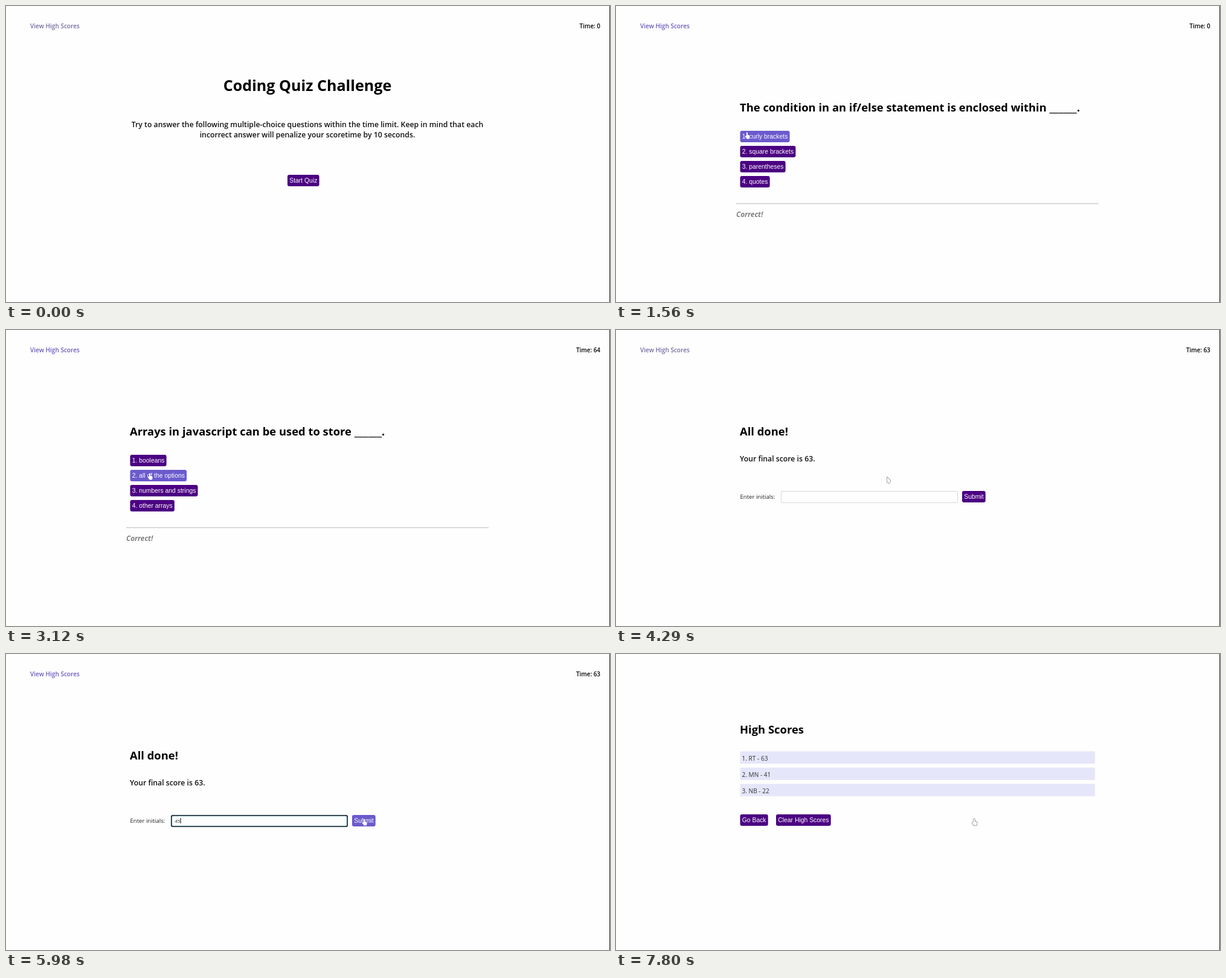
Write an HTML page with a canvas that moves like this. It is 1000x491 px and loops after 8000 ms.

```html
<!DOCTYPE html>
<html lang="en">
<head>
<meta charset="utf-8">
<title>Coding Quiz Challenge</title>
<style>
html, body { margin: 0; width: 100%; height: 100%; overflow: hidden; background: #fefefe; }
canvas { display: block; }
</style>
</head>
<body>
<canvas id="stage" width="1000" height="491"></canvas>
<script>
const ctx = document.getElementById('stage').getContext('2d');
const LOOP = 8000, STEP = 130, TRAVEL = 3 * STEP, TICK = 7 * STEP;
const START = 910, DONE = 3640, SCORES = 7800;
const SANS = '"Open Sans", "Noto Sans", sans-serif';
const ARIAL = '"Liberation Sans", Arial, sans-serif';
const PAPER = '#fefefe', INDIGO = '#4b0082', SLATE = '#6a5acd', FOCUS = '#add8e6';

const questions = [
  { at: START, lines: ['Commonly used data types do NOT include ______.'],
    options: ['alerts', 'booleans', 'numbers', 'strings'] },
  { at: 1430, note: 'Correct!', lines: ['The condition in an if/else statement is enclosed within ______.'],
    options: ['curly brackets', 'square brackets', 'parentheses', 'quotes'] },
  { at: 2210, note: 'Correct!', focusAt: 2470,
    lines: ['String values must be enclosed with ______ when being assigned', 'to variables.'],
    options: ['commas', 'curly brackets', 'quotes', 'parentheses'] },
  { at: 2600, note: 'Wrong!',
    lines: ['A very useful tool used during development and debugging', 'for printing content to the debugger is ______.'],
    options: ['console.log', 'for loops', 'javascript', 'terminal / bash'] },
  { at: 3120, note: 'Correct!', lines: ['Arrays in javascript can be used to store ______.'],
    options: ['booleans', 'all of the options', 'numbers and strings', 'other arrays'] }
];

// Places the pointer visits, with the time it arrives at each
const submit = { x: 594, y: 279 }, field = { x: 440, y: 277 };
const stops = [
  { at: 260, x: 640, y: 150 }, { at: 650, x: 495, y: 289 }, { at: 1300, x: 218, y: 215 },
  { at: 1950, x: 238, y: 266 }, { at: 2340, x: 239, y: 243 }, { at: 4290, x: 449, y: 249 },
  { at: 4550, ...submit }, { at: 5200, ...field }, { at: 5980, ...submit },
  { at: 6630, ...field }, { at: 7540, ...submit }
];

let pointer, hovered;

const between = (t, from, to) => t >= from && t < to;
const typed = (str, t, from, delay) => str.slice(0, Math.max(0, Math.floor((t - from) / delay) + 1));

function pointerAt(t) {
  const i = stops.findLastIndex(s => s.at <= t);
  if (i < 0) return null;
  const a = stops[i], b = stops[i + 1] || a;
  const depart = Math.max(a.at, b.at - TRAVEL);
  const k = Math.min(1, Math.max(0, (t - depart) / (b.at - depart || 1)));
  const ease = k * k * (3 - 2 * k);
  return { x: a.x + (b.x - a.x) * ease, y: a.y + (b.y - a.y) * ease };
}

// Counts down from 75 after the first tick; the wrong answer costs ten seconds
function timeLeft(t) {
  const ticks = Math.floor((Math.min(t, DONE) - START) / TICK);
  return ticks < 1 ? 0 : 76 - ticks - (t >= questions[3].at ? 10 : 0);
}

function initials(t) {
  if (t < 6890) return typed('45', t, 5460, 2 * STEP);
  return t < 7020 ? '4' : typed('RT', t, 7150, STEP);
}

function errorText(t) {
  if (between(t, 4680, 5200)) return 'Initials cannot be blank!';
  return between(t, 6240, 7150) ? 'Initials may only be letters!' : '';
}

const inside = (x, y, w, h) => pointer && pointer.x >= x && pointer.x <= x + w &&
  pointer.y >= y && pointer.y <= y + h;

function text(str, x, y, size, { weight = 400, color = '#000', align = 'left', family = SANS, style = '' } = {}) {
  ctx.font = `${style} ${weight} ${size}px ${family}`;
  ctx.fillStyle = color;
  ctx.textAlign = align;
  ctx.fillText(str, x, y);
  return ctx.measureText(str).width;
}

// Blanks use a face with wider underscores
function title(str, y) {
  let x = 205;
  for (const part of str.split(/(_+)/)) {
    x += text(part, x, y, 18.4, { weight: 700, family: part[0] === '_' ? '"Noto Sans", sans-serif' : SANS });
  }
}

const body = (str, x, y, align) => text(str, x, y, 12.28, { weight: 600, align, color: '#111' });
const remark = (str, y) => text(str, 199, y, 11.8, { weight: 700, style: 'italic', color: '#808080' });

function box(x, y, w, h, r, fill) {
  ctx.beginPath();
  ctx.roundRect(x, y, w, h, r);
  ctx.fillStyle = fill;
  ctx.fill();
}

// Draws a button and returns its height
function button(label, x, y, focused) {
  const size = 10.4, edge = focused ? 2.5 : 0;
  ctx.font = `${size}px ${ARIAL}`;
  const w = ctx.measureText(label).width + 6.4 + edge * 2, h = 19 + edge * 2;
  const over = inside(x, y, w, h);
  if (over) hovered = true;
  if (focused) box(x, y, w, h, 3, FOCUS);
  box(x + edge, y + edge, w - edge * 2, 19, focused ? 0 : 3, over ? SLATE : INDIGO);
  text(label, x + 3.2 + edge, y + edge + 13, size, { family: ARIAL, color: '#fff' });
  return h;
}

function drawIntro() {
  text('Coding Quiz Challenge', 499, 141, 25.1, { weight: 700, align: 'center' });
  body('Try to answer the following multiple-choice questions within the time limit. Keep in mind that each', 499, 201, 'center');
  body('incorrect answer will penalize your scoretime by 10 seconds.', 499, 218, 'center');
  button('Start Quiz', 466, 280);
}

function drawQuestion(q, t) {
  q.lines.forEach((line, i) => title(line, 174.5 + 25.5 * i));
  let y = 207 + 26 * (q.lines.length - 1);
  q.options.forEach((option, i) => {
    y += 6 + button(`${i + 1}. ${option}`, 205.5, y, i === 0 && t >= q.focusAt);
  });
  if (!q.note) return;
  ctx.fillStyle = '#cecece';
  ctx.fillRect(199, y + 20, 600, 1.5);
  remark(q.note, y + 42.5);
}

function drawInput(value, focused) {
  const edge = focused ? 2.5 : 1;
  box(273, 267, 293, 20, 3, focused ? '#14202c' : '#d8d8dc');
  if (focused) box(274.5, 268.5, 290, 17, 2, FOCUS);
  box(273 + edge, 267 + edge, 293 - edge * 2, 20 - edge * 2, 2, PAPER);
  const width = text(value, 279.5, 279.5, 7.5, { color: '#222' });
  if (focused) box(280 + width, 272, 1, 9, 0, '#000');
}

function drawDone(t) {
  title('All done!', 174.5);
  body('Your final score is 63.', 205, 218);
  text('Enter initials:', 205.5, 280, 9.6, { color: '#222' });
  drawInput(initials(t), between(t, 5200, 6240) || t >= 6630);
  button('Submit', 573, 267);
  remark(errorText(t), 329);
}

function drawScores() {
  title('High Scores', 131.5);
  ['RT - 63', 'MN - 41', 'NB - 22'].forEach((entry, i) => {
    const y = 161.5 + 27 * i;
    box(205.5, y, 587.5, 20.5, 0, '#e6e6fa');
    text(`${i + 1}. ${entry}`, 208.5, y + 15, 10.1, { color: '#333' });
  });
  button('Go Back', 205.5, 266);
  button('Clear High Scores', 265, 266);
}

// Outlines the current path and fills it, so overlapping parts merge
function outlined(color) {
  ctx.strokeStyle = color;
  ctx.lineWidth = 1.6;
  ctx.lineJoin = 'round';
  ctx.stroke();
  ctx.fillStyle = '#fff';
  ctx.fill();
}

function drawHand(x, y, color) {
  ctx.beginPath();
  ctx.roundRect(x - 2, y - 5.5, 2, 9, 1);
  ctx.roundRect(x - 2.5, y - 1, 6, 6.5, 2);
  ctx.roundRect(x - 4, y, 3, 3, 1.2);
  outlined(color);
}

function drawArrow(x, y) {
  ctx.beginPath();
  ctx.moveTo(x, y - 5);
  ctx.lineTo(x, y + 3.5);
  ctx.lineTo(x + 3.5, y + 5);
  ctx.lineTo(x + 5.5, y + 1.2);
  ctx.closePath();
  outlined('#888');
}

function drawBeam(x, y) {
  box(x, y - 5, 1, 10, 0, '#444');
  for (const dy of [-5, 4]) box(x - 1.5, y + dy, 4, 1, 0, '#444');
}

function drawPointer(t) {
  if (!pointer) return;
  const { x, y } = pointer;
  const typing = between(t, 5460, 5720) || between(t, 6890, 7280);
  if (between(t, DONE, SCORES) && inside(273, 267, 293, 20)) {
    if (!typing) drawBeam(x, y);
  } else if (hovered || t >= SCORES) {
    drawHand(x, y, hovered ? SLATE : '#888');
  } else {
    drawArrow(x, y);
  }
}

function draw(t) {
  pointer = pointerAt(t);
  hovered = false;
  box(0, 0, 1000, 491, 0, PAPER);
  box(999, 0, 1, 491, 0, '#333');

  if (t < START) drawIntro();
  else if (t < DONE) drawQuestion(questions.findLast(q => q.at <= t), t);
  else if (t < SCORES) drawDone(t);
  else drawScores();

  if (t < SCORES) {
    text('View High Scores', 40, 36.5, 10.05, { weight: 600, color: hovered ? '#6a5cc0' : '#766ba3' });
    text(`Time: ${timeLeft(t)}`, 984, 36.5, 9.9, { weight: 600, align: 'right' });
  }
  drawPointer(t);
}

function frame() {
  const t = performance.now() % LOOP;
  draw(Math.floor(t / STEP) * STEP);
  requestAnimationFrame(frame);
}
frame();
</script>
</body>
</html>
```
